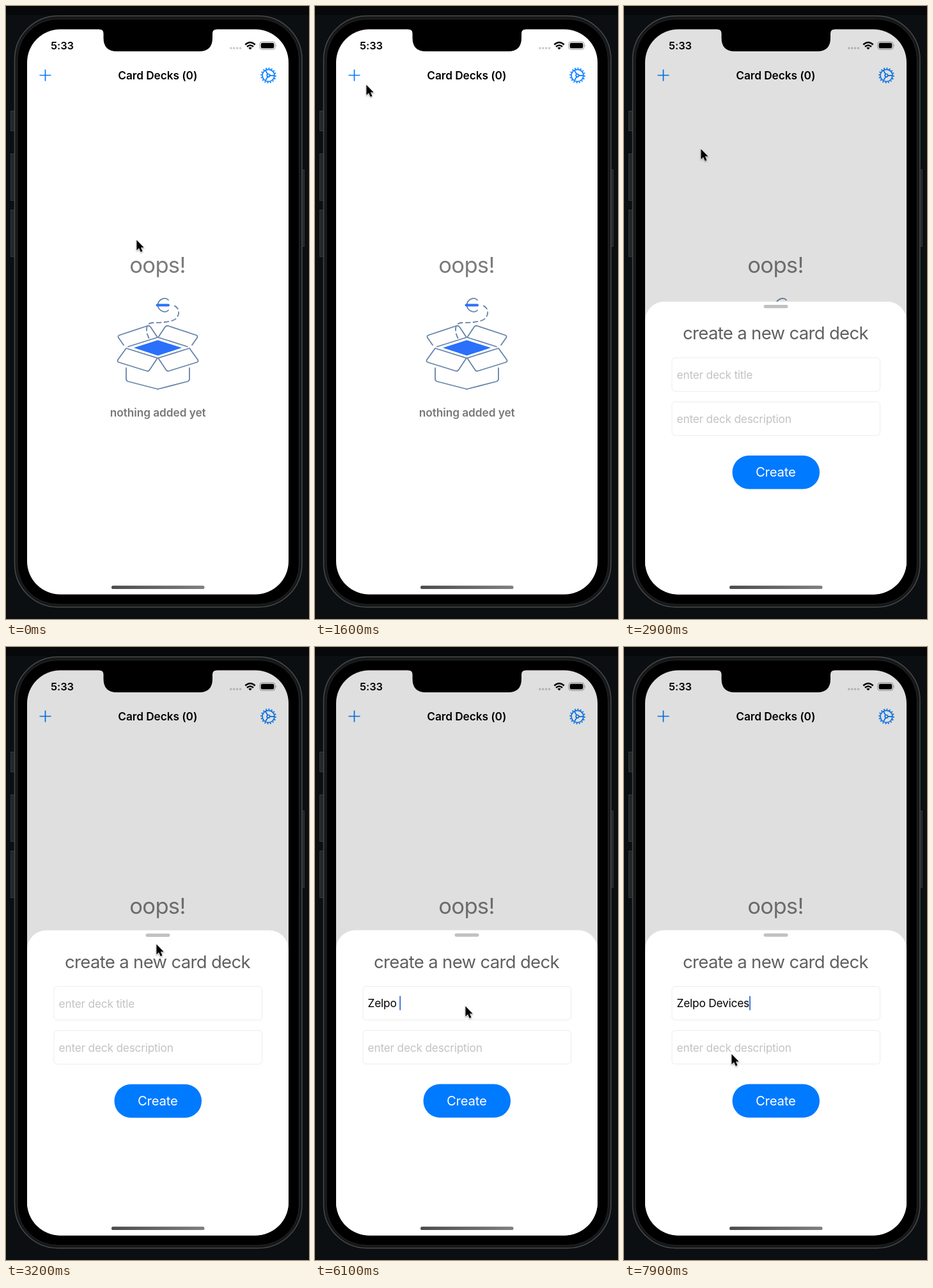
Animation, 474 px wide and 960 px high, one loop 8000 ms. Source, as an HTML page:

```html
<!DOCTYPE html>
<html lang="en">
<head>
<meta charset="utf-8">
<title>Card decks</title>
<style>
  html, body { margin: 0; width: 100%; height: 100%; overflow: hidden; background: #0b0f11; }
  svg { display: block; width: 100%; height: 100%; }
  text { font: 17.3px Inter, "Open Sans", sans-serif; letter-spacing: -.2px; white-space: pre; font-optical-sizing: none; }
  .bold { font-weight: 600; letter-spacing: -.08px; }
  .mid { text-anchor: middle; }
  .hint { fill: #c3c3c5; }
  .line { fill: none; stroke: #6683aa; stroke-width: 1.8; stroke-linecap: round; stroke-linejoin: round; }
  .blue { fill: none; stroke: #007aff; stroke-width: 1.7; }
  .field { fill: #fff; stroke: #ececec; }
</style>
</head>
<body>
<svg viewBox="0 0 474 960">
  <defs>
    <clipPath id="screen"><rect x="33" y="36.500" width="409" height="885" rx="52"/></clipPath>
    <linearGradient id="bar"><stop stop-color="#4c4c4c"/><stop offset="1" stop-color="#808080"/></linearGradient>
    <g id="half" class="line">
      <path d="M184 531L176 519.500Q174.500 516.500 177.500 515.500L221 501Q224 500 226 502.500L237 519L191 533.500"/>
      <path d="M188 536L237 551.300L224.500 570Q223 572.500 220 571.500L176.500 558Q173.500 557 175 554Z"/>
      <path d="M188 567V584Q188 587 191 588L237.500 600"/>
    </g>
  </defs>

  <!-- phone body -->
  <rect width="474" height="960" fill="#0b0f11"/>
  <rect width="474" height="14" fill="#060809"/>
  <g fill="#232627" stroke="#36393a">
    <rect x="7.500" y="164.500" width="7" height="31"/>
    <rect x="7.500" y="231.500" width="7" height="73"/>
    <rect x="7.500" y="319.500" width="7" height="73"/>
    <rect x="461.500" y="256.500" width="5" height="120"/>
  </g>
  <rect x="13.500" y="15.500" width="449.500" height="926" rx="68" fill="#151718" stroke="#48494a" stroke-width="1.500"/>
  <rect x="18" y="20.500" width="440.500" height="916.500" rx="63" stroke="#242626"/>

  <g clip-path="url(#screen)">
    <rect x="33" y="36" width="410" height="887" fill="#fff"/>
    <text class="bold" x="70" y="68" style="font-size:16.500px">5:33</text>
    <g fill="#c9c9c9">
      <circle cx="351.800" cy="66" r="1.800"/><circle cx="356.700" cy="66" r="1.800"/>
      <circle cx="361.600" cy="66" r="1.800"/><circle cx="366.500" cy="66" r="1.800"/>
    </g>
    <g fill="none" stroke="#000" stroke-width="2.500">
      <path d="M374.300 60.500Q382 53.500 389.700 60.500M377 63.700Q382 59.300 387 63.700"/>
    </g>
    <path d="M379.300 65.500Q382 63.300 384.700 65.500L382 68.300Z"/>
    <rect x="397" y="56" width="24" height="12" rx="3.600" fill="none" stroke="#999"/>
    <rect x="398.700" y="57.700" width="20.600" height="8.600" rx="2.200"/>
    <path d="M422.300 60V64Q424 62 422.300 60Z" fill="#999"/>

    <path class="blue" d="M52.500 108.500H70.500M61.500 99.500V117.500"/>
    <text class="bold mid" x="237.300" y="114.700">Card Decks (0)</text>
    <g class="blue" transform="translate(410.500 108.800)" stroke-width="1.500">
      <circle r="9.500"/>
      <circle r="11.400" pathLength="32" stroke-dasharray=".9 1.100"/>
      <circle r="2.300"/>
      <path d="M2.400 0H9.500M-1.200-2.100L-4.800-8.200M-1.200 2.100L-4.800 8.200"/>
    </g>

    <text class="mid" x="237" y="418" fill="#7b7b7b" style="font-size:34.600px;letter-spacing:-.7px">oops!</text>
    <use href="#half"/>
    <use href="#half" transform="translate(475) scale(-1 1)"/>
    <path d="M200 535.300L237.500 523.300L275 535.300L237.500 547.500Z" fill="#2a70fb"/>
    <path class="line" stroke-dasharray="7 5" d="M223.500 520C218 509 218 496 230 496C245 496 254 495 262 492C272 488 274 472 261 468.500"/>
    <path class="line" d="M254 460.500C249 455 238 459 237.500 468.500C238 477 249 482 254 476.500"/>
    <path d="M236.500 468.400H254" stroke="#2a70fb" stroke-width="4" stroke-linecap="round"/>
    <text class="bold mid" x="237.700" y="643.300" fill="#777">nothing added yet</text>

    <rect id="dim" x="33" y="36" width="410" height="887"/>

    <g id="sheet">
      <rect x="33" y="443.500" width="409" height="540" rx="30" fill="#fff"/>
      <rect x="218.500" y="448.500" width="38" height="5.200" rx="2.600" fill="#c1c1c2"/>
      <text class="mid" x="237" y="503" fill="#606060" style="font-size:27.500px;letter-spacing:-.67px">create a new card deck</text>
      <rect class="field" x="75" y="531.500" width="325.500" height="52.500" rx="5"/>
      <rect class="field" x="75" y="600.500" width="325.500" height="52.500" rx="5"/>
      <text class="hint" id="hint" x="82.500" y="564.300">enter deck title</text>
      <text id="typed" x="82.500" y="564.300"></text>
      <rect id="caret" y="546.500" width="1.900" height="22.500" rx="1" fill="#3c70dc"/>
      <text class="hint" x="82.500" y="633.500">enter deck description</text>
      <rect x="169.500" y="684.500" width="136.500" height="52.500" rx="26" fill="#007aff"/>
      <text class="mid" x="237.300" y="718" fill="#fff" style="font-size:20.300px">Create</text>
    </g>
    <rect x="165" y="907.700" width="145.500" height="5.300" rx="2.600" fill="url(#bar)"/>
  </g>

  <!-- notch -->
  <path d="M146 35V36.500Q152.500 36.500 152.500 43V50Q152.500 71 173.500 71H302Q323 71 323 50V43Q323 36.500 329.500 36.500V35Z"/>

  <path id="cursor" d="M-.6-.4V15.600L3.100 12.300L5.800 18.300L8.500 17.100L5.900 11.200H10.700Z" stroke="#fff" stroke-width="1.200" paint-order="stroke"
    style="filter:drop-shadow(0 1px 1px #0006)"/>
</svg>
<script>
const LOOP = 8000, OPEN = 2607, FOCUS = 3900;
const TITLE = "Zelpo Devices";
const keyTimes = [4650, 4820, 5050, 5250, 5500, 5900, 6300, 6500, 6670, 6850, 7050, 7250, 7450];
// time, x, y of the pointer
const path = [
  [900, 205, 367], [1600, 81, 124], [1950, 67, 111],
  [2720, 67, 111], [3200, 236, 466], [3550, 236, 563],
  [7500, 236, 563], [7900, 169, 638]
];
const [dim, sheet, hint, typed, caret, cursor] =
  ["dim", "sheet", "hint", "typed", "caret", "cursor"].map(id => document.getElementById(id));
const ease = u => u * u * (3 - 2 * u);

function pointerAt(t) {
  const i = path.findIndex(p => p[0] > t);
  if (i < 0) return path.at(-1).slice(1);
  if (i === 0) return path[0].slice(1);
  const [t0, x0, y0] = path[i - 1], [t1, x1, y1] = path[i];
  const u = ease((t - t0) / (t1 - t0));
  return [x0 + (x1 - x0) * u, y0 + (y1 - y0) * u];
}

// critically damped spring
function openness(t) {
  const s = Math.max(0, t - OPEN) * .017;
  return 1 - (1 + s) * Math.exp(-s);
}

function draw(now) {
  const t = now % LOOP;
  const open = openness(t);
  dim.setAttribute("opacity", .125 * open);
  sheet.setAttribute("transform", `translate(0 ${480 * (1 - open)})`);

  const count = keyTimes.filter(k => k <= t).length;
  typed.textContent = TITLE.slice(0, count);
  hint.style.display = count ? "none" : "";
  const since = t - (count ? keyTimes[count - 1] : FOCUS);
  caret.style.display = since >= 0 && since % 1000 < 550 ? "" : "none";
  caret.setAttribute("x", 82.5 + (count ? typed.getComputedTextLength() : 0));

  cursor.setAttribute("transform", `translate(${pointerAt(t)})`);
  requestAnimationFrame(() => draw(performance.now() - start));
}
const start = performance.now();
draw(0);
</script>
</body>
</html>
```
